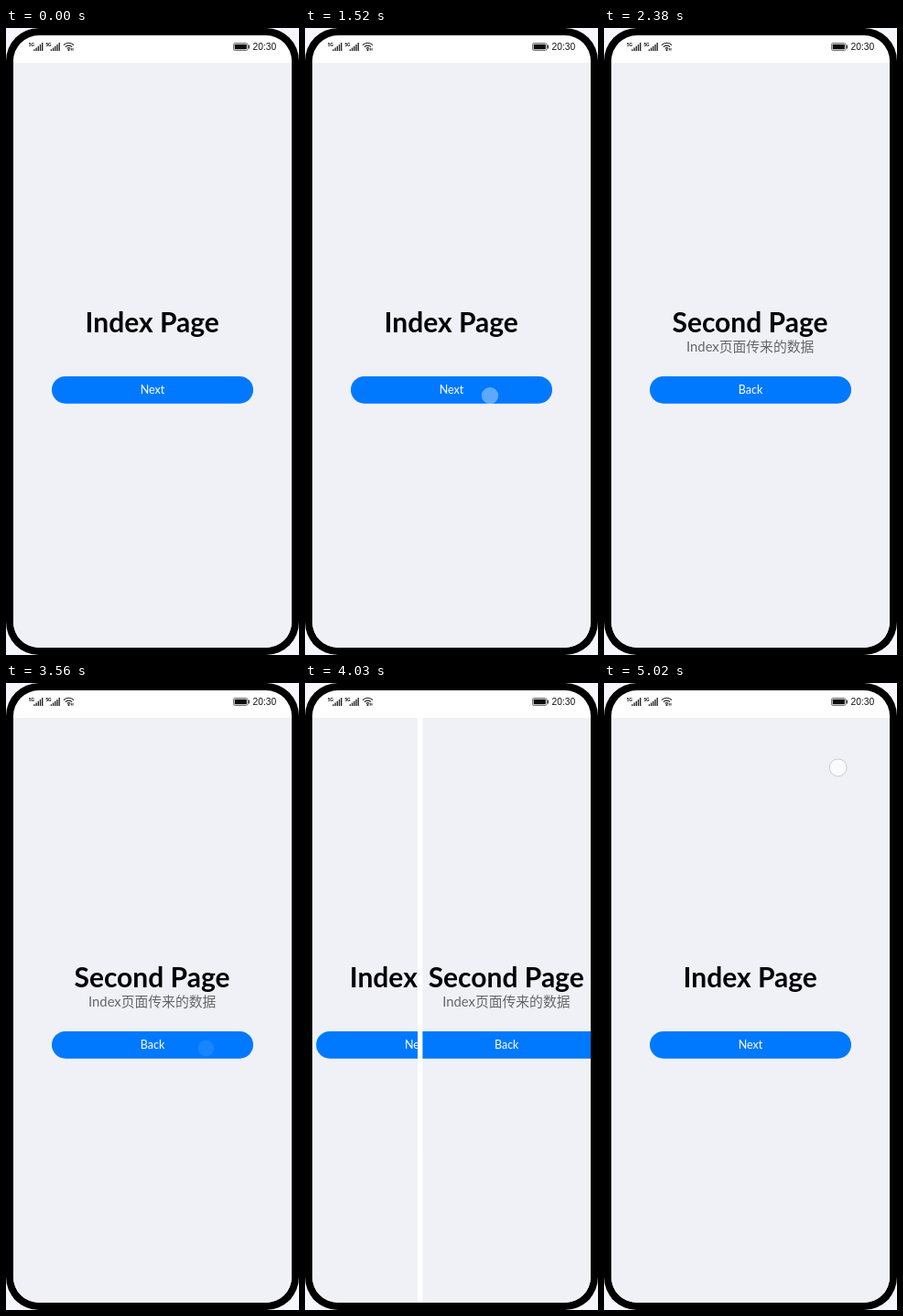
Animation, 320 px wide and 684 px high, one loop 5080 ms. Source, as an HTML page:

```html
<!DOCTYPE html>
<html lang="en">
<head>
<meta charset="utf-8">
<title>Page navigation</title>
<style>
  html, body { margin: 0; width: 100%; height: 100%; overflow: hidden; background: #f6f6fe; }
  svg { display: block; width: 320px; height: 684px; }
  text { text-anchor: middle; font-family: Lato, "Noto Sans CJK SC", "Noto Sans CJK", sans-serif; }
  .title { font-size: 30px; font-weight: 700; fill: #050507; }
  .note { font-size: 14.8px; fill: #666669; }
  .label { font-size: 12.5px; fill: #fff; }
  .button { fill: #0079ff; }
  .page { fill: #f0f1f6; }
  .clock { font: 10.3px "Liberation Sans", Arial, sans-serif; fill: #151515; }
  .net { font: bold 4.6px "Liberation Sans", Arial, sans-serif; fill: #111; }
</style>
</head>
<body>
<svg viewBox="0 0 320 684">
  <defs>
    <clipPath id="screen"><rect x="8" y="8" width="304" height="668" rx="28"/></clipPath>
    <clipPath id="leftClip"><rect id="leftRect" x="8" y="38" width="304" height="638"/></clipPath>
    <clipPath id="rightClip"><rect id="rightRect" x="312" y="38" width="304" height="638"/></clipPath>
    <g id="signal">
      <text class="net" x="2.6" y="4.6">5G</text>
      <path d="M5.4 10V8.2M7.6 10V6.6M9.8 10V4.8M12 10V3M14.2 10V1" stroke="#1c1c1c" stroke-width="1.3"/>
    </g>
  </defs>

  <rect width="320" height="684" rx="36"/>
  <g clip-path="url(#screen)">
    <rect x="8" y="8" width="304" height="668" fill="#fff"/>

    <g clip-path="url(#leftClip)">
      <rect class="page" x="8" y="38" width="304" height="638"/>
      <g id="index">
        <text class="title" x="159.7" y="332">Index Page</text>
        <rect class="button" x="50" y="380" width="220" height="29.7" rx="14.85"/>
        <text class="label" x="160" y="399.3">Next</text>
      </g>
    </g>

    <g clip-path="url(#rightClip)">
      <rect class="page" x="8" y="38" width="304" height="638"/>
      <g id="second">
        <text class="title" x="159.5" y="332">Second Page</text>
        <text class="note" x="159.7" y="353">Index页面传来的数据</text>
        <rect class="button" x="50" y="380" width="220" height="29.7" rx="14.85"/>
        <text class="label" x="160" y="399.3">Back</text>
      </g>
    </g>

    <circle id="dot" stroke-width="1"/>

    <use href="#signal" x="25.5" y="15"/>
    <use href="#signal" x="44" y="15"/>
    <g fill="none" stroke="#1c1c1c" stroke-width="1.2">
      <path d="M63 18.6a7.6 7.6 0 0 1 11 0M64.9 20.6a5 5 0 0 1 7.2 0M66.7 22.4a2.6 2.6 0 0 1 3.6 0"/>
      <circle cx="68.5" cy="24" r=".5"/>
      <path d="M71.3 24.6v-2.6M73 22v2.6" stroke-width=".9"/>
    </g>
    <rect x="248.5" y="16.5" width="15.5" height="8" rx="1.6" fill="none" stroke="#77777a"/>
    <rect x="249.7" y="17.7" width="13.1" height="5.6" rx=".6" fill="#0c0c0c"/>
    <rect x="264.5" y="18.6" width="1.5" height="3.8" rx=".5" fill="#333"/>
    <text class="clock" x="282.4" y="23.7">20:30</text>
  </g>
</svg>

<script>
  const LOOP = 5080, STEP = LOOP / 77, WIDTH = 304, LEFT = 8;
  const PUSH = { start: 1650, length: 260 };
  const POP = { start: 3983.6, length: 180, lag: 1.4 };
  const touches = [
    { x: 202, y: 401, r: 8.8, from: 1130, to: 1710, fill: "#ffffff5c", stroke: "#ffffff30" },
    { x: 218.5, y: 398.5, r: 8.4, from: 3500, to: 4020, fill: "#ffffff50", stroke: "#ffffff28" },
    { x: 255.7, y: 92.3, r: 9.4, from: 4760, to: 5200, fill: "#fafaff", stroke: "#c9cad0" }
  ];

  const get = id => document.getElementById(id);
  const [index, second, leftRect, rightRect, dot] =
    ["index", "second", "leftRect", "rightRect", "dot"].map(get);
  const clamp = v => Math.min(1, Math.max(0, v));

  // cubic-bezier(.2, 0, .2, 1)
  function ease(x) {
    if (x <= 0 || x >= 1) return clamp(x);
    let lo = 0, hi = 1;
    for (let i = 0; i < 24; i++) {
      const s = (lo + hi) / 2;
      if (.6 * s * (1 - s) + s ** 3 < x) lo = s; else hi = s;
    }
    return lo * lo * (3 - 2 * lo);
  }

  // Share of the screen still left to the first page
  function share(t, lag) {
    const pushed = ease((t - PUSH.start) / PUSH.length);
    const popped = ease((t - POP.start - lag) / POP.length);
    return 1 - pushed + popped;
  }

  function draw(t) {
    const left = share(t, POP.lag), right = share(t, 0);
    leftRect.setAttribute("width", WIDTH * left);
    index.setAttribute("transform", `translate(${-.2 * WIDTH * (1 - left)})`);
    rightRect.setAttribute("x", LEFT + WIDTH * right);
    second.setAttribute("transform", `translate(${.5 * WIDTH * right})`);

    const touch = touches.find(p => t > p.from && t < p.to);
    dot.setAttribute("visibility", touch ? "visible" : "hidden");
    if (!touch) return;
    dot.setAttribute("cx", touch.x);
    dot.setAttribute("cy", touch.y);
    dot.setAttribute("r", touch.r);
    dot.setAttribute("fill", touch.fill);
    dot.setAttribute("stroke", touch.stroke);
    dot.setAttribute("opacity", Math.min(clamp((t - touch.from) / 220), clamp((touch.to - t) / 130)));
  }

  // Motion advances in even ticks, about 15 per second
  const begin = performance.now();
  function tick() {
    const t = (performance.now() - begin) % LOOP;
    draw(Math.floor(t / STEP + .06) % 77 * STEP);
    requestAnimationFrame(tick);
  }
  tick();
</script>
</body>
</html>
```
